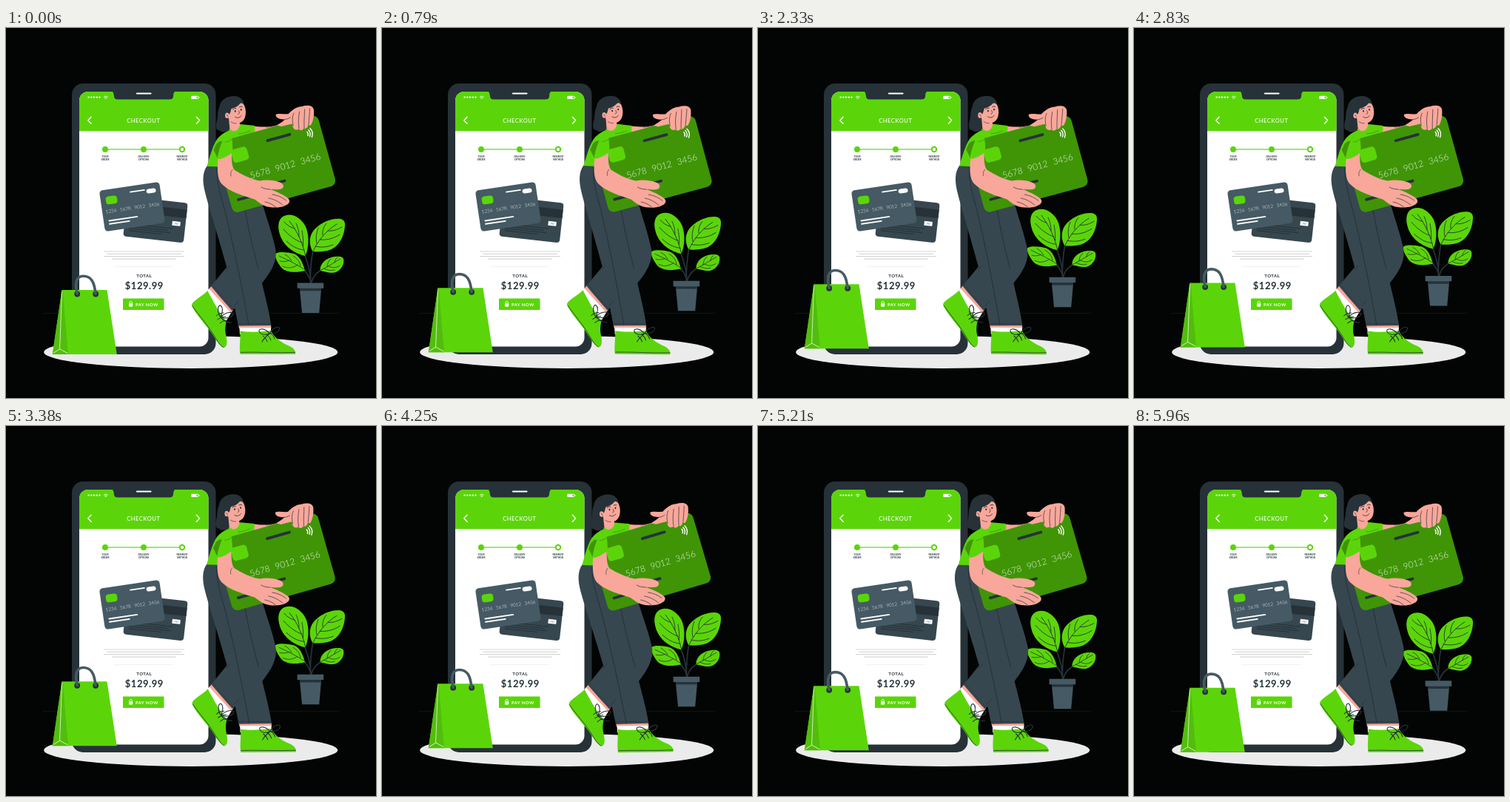
Write an HTML page with a canvas that moves like this. It is 500 px wide and 500 px high and loops after 6 s.

```html
<!DOCTYPE html>
<html lang="en">
<head>
<meta charset="utf-8">
<title>Checkout</title>
<style>
html, body { margin: 0; width: 100%; height: 100%; overflow: hidden; background: #030504; }
canvas { display: block; width: 100vw; height: 100vh; }
</style>
</head>
<body>
<canvas id="stage"></canvas>
<script>
const canvas = document.getElementById('stage');
const ctx = canvas.getContext('2d');
const LOOP = 6000;
const GREEN = '#5bd50a', DEEP = '#3f9506', SHADE = '#52bd0d';
const INK = '#263238', SLATE = '#455a64', CLOTH = '#37474f';
const SKIN = '#f9a79b', WHITE = '#fff', BACK = '#030504';

const paths = new Map();
function path(d) {
  if (!paths.has(d)) paths.set(d, new Path2D(d));
  return paths.get(d);
}
function fill(d, color) {
  ctx.fillStyle = color;
  ctx.fill(path(d));
}
function line(d, color, width) {
  ctx.strokeStyle = color;
  ctx.lineWidth = width;
  ctx.lineCap = ctx.lineJoin = 'round';
  ctx.stroke(path(d));
}
function box(x, y, w, h, r, color) {
  ctx.fillStyle = color;
  ctx.beginPath();
  ctx.roundRect(x, y, w, h, r);
  ctx.fill();
}
function dot(x, y, rx, color, ry = rx) {
  ctx.fillStyle = color;
  ctx.beginPath();
  ctx.ellipse(x, y, rx, ry, 0, 0, Math.PI * 2);
  ctx.fill();
}
function text(str, x, y, size, weight, color, spacing = 0, align = 'center', gap = 0) {
  ctx.font = `${weight} ${size}px Lato, sans-serif`;
  ctx.letterSpacing = spacing + 'px';
  ctx.wordSpacing = gap + 'px';
  ctx.textAlign = align;
  ctx.fillStyle = color;
  ctx.fillText(str, x, y);
}
function at(x, y, deg, draw) {
  ctx.save();
  ctx.translate(x, y);
  ctx.rotate(deg * Math.PI / 180);
  draw();
  ctx.restore();
}

function drawFloor() {
  line('M50 385.5H450', '#11181a', 0.8);
  dot(249.7, 438, 198.5, '#ebebeb', 22);
}

function drawHeader() {
  box(99, 86, 174.5, 53.2, [12, 12, 0, 0], GREEN);
  fill('M142 85.5C146 86 145.5 90 146 92.5C146.5 95.5 148 96.5 151 96.5H221C224 96.5 225.5 95.5 226 92.5C226.5 90 226 86 230 85.5Z', INK);
  line('M177 88.5H195.5', WHITE, 2.2);
  for (let i = 0; i < 5; i++) dot(111.6 + i * 3.7, 93.6, 1.2, WHITE);
  line('M132.2 93Q134.8 90.8 137.4 93M133.4 94.4Q134.8 93.2 136.2 94.4', WHITE, 0.8);
  dot(134.8, 95.6, 0.6, WHITE);
  box(250.3, 91.7, 9.8, 4.4, 1, WHITE);
  box(260.5, 93, 1, 1.8, 0.4, WHITE);
  box(257.6, 92.5, 1.8, 2.8, 0.3, GREEN);
  line('M115 120.3L110.8 124.8L115 129.3M257.4 120.3L261.6 124.8L257.4 129.3', WHITE, 1.4);
  text('CHECKOUT', 185.8, 127.8, 7.6, 500, WHITE, 0.5);
}

function drawSteps() {
  line('M134 164H238', '#7be04a', 1.5);
  dot(134, 164, 4, GREEN);
  dot(186, 164, 4, GREEN);
  dot(238, 164, 4.2, GREEN);
  dot(238, 164, 2.2, WHITE);
  [['YOUR', 'ORDER', 134], ['DELIVERY', 'OPTIONS', 186], ['PAYMENT', 'METHOD', 238]].forEach(([a, b, x]) => {
    text(a, x, 175, 3.2, 700, INK);
    text(b, x, 179, 3.2, 700, INK);
  });
}

function drawCards() {
  at(202, 259, 6.3, () => {
    box(-41, -27, 82, 54, 4, CLOTH);
    box(-41, -18, 82, 11.5, 0, INK);
    box(23, -0.8, 11, 6, 0.5, WHITE);
    line('M26.5 3.6L28 1L29.5 3.4L31 1.2', SLATE, 0.5);
    line('M-34 9.5H24M-34 12.5H18M-34 15.5H22M-34 18.5H10', INK, 1);
  });
  at(170.5, 241.5, -8.4, () => {
    box(-41, -28, 82, 56, 4.5, SLATE);
    box(-34, -18.5, 15.5, 10.8, 4, GREEN);
    box(22, -20.5, 13, 6, 3, WHITE);
    line('M.5 -20H19.5', WHITE, 1.9);
    text('1234 5678 9012 3456', 0.3, 3.8, 6.4, 300, WHITE, 0, 'center', 3);
    line('M-33.5 14.2H4.8M-33.5 18.6H-6.5', WHITE, 1.9);
  });
}

function drawPhone() {
  box(89, 75, 194.5, 366, 15, INK);
  box(99, 86, 174.5, 344.5, 12, WHITE);
  drawHeader();
  drawSteps();
  drawCards();
  line('M132.5 302H240.5M137 305.4H236.5M132.5 308.7H240.5M143.5 312.2H229', '#d6d6d6', 1.2);
  line('M146 322.5H224', '#eeeeee', 0.8);
  text('TOTAL', 186.7, 337.2, 6.1, 700, INK, 0.35);
  text('$129.99', 186.8, 353, 13, 700, INK, 0.55);
  box(158, 365.5, 55.5, 15.5, 0.5, GREEN);
  box(166, 372, 5.2, 4.4, 0.6, WHITE);
  line('M167 372.3V371A1.6 1.6 0 0 1 170.2 371V372.3', WHITE, 0.9);
  text('PAY NOW', 190.3, 375.5, 6, 700, WHITE, 0.35);
}

function drawBag() {
  fill('M75.5 354H136.5L149.8 441H62.8Z', GREEN);
  fill('M75.5 354H76.5L84 441H62.8Z', SHADE);
  line('M75.6 356L72.6 433.5', '#d9f5c4', 0.9);
  line('M64.5 439L72.6 433.8L83 439.4', '#e3f8d3', 0.9);
  dot(96.2, 359.5, 3.9, INK);
  dot(121.2, 359.5, 3.9, INK);
  line('M96.2 359C92.5 345 95 335.3 104.5 335.3C115 335.3 119.5 343 121 359', SLATE, 3.6);
}

function drawPlant() {
  line('M412 346C412 334 409 320 403 305M411.5 346C411 330 412 315 415 300M412 344C410 334 406 328 397 324M412.5 344C415 334 421 329 430 325', INK, 1.7);
  fill('M404.5 308C391 305 378 297 372 284C366 270 367 257 377 253.5C388 249.5 401 258 406 271C410 283 409 298 404.5 308Z', GREEN);
  fill('M414.5 302C408.5 292 409.5 279 418 271C428 261 443 256.5 452 258C456.5 259 458.5 262 458 267C457 284 448 298 434 301C427 302.5 419 302.5 414.5 302Z', GREEN);
  fill('M404 328C392 331 378 331 371.5 323C367 317 362.5 309 364 305C367 302 380 302.5 389 305C397 308 401 317 404 328Z', GREEN);
  fill('M424.5 328C424 318 433 310.5 444 309C451 308 456.5 309 456.3 313.5C457 322 450 330 442 330.8C434 331 429 328.5 424.5 328Z', GREEN);
  line('M405 309C401 291 394 275 383 261M401.5 295C402 286 401 280 400 274M396 282C396 274 394 268 392 264M400 290C391 287 382 280 375 272M403 300C394 299 386 295 379 288M390 271C386 270 380 267 376 262', INK, 0.9);
  line('M413.6 305C420 289 432 274 447 265M420 291C418 283 420 275 422 270M428 280C427 274 430 267 433 264M424 286C434 287 444 284 451 279M418 295C427 297 434 296 442 293M435 274C442 275 449 272 454 269', INK, 0.9);
  line('M406 328C394 320 382 314 369 308M394 320C387 325 380 325 374 322M383 314C378 316 374 316 370 315M398 322C397 315 393 311 388 308M386 315C384 311 381 308 377 306', INK, 0.8);
  line('M424 328C434 323 443 317 452 312M436 322C443 325 447 324 451 321M430 325C436 328 440 328 444 327M434 323C434 318 436 314 439 312M444 317C444 314 446 311 448 310', INK, 0.8);
  fill('M396.8 351H426.2L423.2 385H400Z', SLATE);
  fill('M396.8 351H426.2L425.8 355.2H397.2Z', INK);
  box(393.6, 344.5, 35.6, 7.3, 0.5, SLATE);
}

function drawShoes() {
  fill('M279 347L307 381L302 388L273 354Z', SKIN);
  fill('M274.5 352.5L304 385L297 397L269 358Z', WHITE);
  fill('M272.5 355C267 361 255 367 251.2 373C250 378 262 392 274 407C282 417 287 430 294.5 432C299.5 430.5 299 423 297 414C295.5 406 297 400 298 396C293 391 286 380 281 371C278 365 275 361 272.5 355Z', GREEN);
  line('M251.8 375.5C262 390 272 401 279 412C284 420 288 428 293.5 431.5', INK, 0.8);
  line('M284 389C287 386 291 385 294 385M286 394C290 391 294 390 297 390M289 399C292 396 296 395 299 395', INK, 1);
  line('M290 391C285 384 286 374 290 375C294 378 292 386 290 391C297 383 307 383 307 387C305 392 297 393 290 391C295 396 300 399 305 398', INK, 1.1);
  fill('M314 401H358L358.4 406H315Z', SKIN);
  fill('M315.5 405H358V414H316Z', WHITE);
  fill('M316.5 409.5C326 411 337 411 346 410L358 409C363 419 371 424 379 428C387 431 392 435 391 440.8H316.5C315 431 317 420 316.5 409.5Z', GREEN);
  line('M317 438.3C340 437.5 365 439.5 390.6 438.4', INK, 0.8);
  line('M347 416C350 418 352 421 353 424M352 414C355 416 357 419 358 422M357 412C360 414 362 417 363 420', INK, 1);
  line('M356 413C350 405 342 406 342 409C343 415 351 415 356 413C362 403 370 403 370 406C369 412 362 413 356 413C350 418 348 420 346 424', INK, 1.1);
}

function drawLegs() {
  fill('M300 321L277 349C286 360 295 370 305.5 382L347 343L340 305Z', CLOTH);
  fill('M300 230L346 236C352 256 361 282 364.3 299C367 317 356 332 345 346L318 330Z', CLOTH);
  fill('M272 186C265 195 265.5 208 269 222C274 242 288 285 298 322L314 402.5L358.4 402C355 380 350 362 345.5 343C336 304 331 262 326 235L300 186Z', CLOTH);
  line('M285 189C284 208 290 226 296 248C307 292 318 345 328 401', INK, 1);
  line('M323 246C327 268 334 300 341 325', INK, 1);
  line('M279 347C288 358 297 369 307 380M314 399.5H357', INK, 0.6);
  line('M303 321L297.5 327M314 369L308 376', INK, 0.8);
}

function drawHead() {
  fill('M289 106C285 113 287 119 284.8 126C283 133 284 139 288 138C291 142 299 141 302.5 137L304 118Z', INK);
  fill('M301 122L302.5 138C307 143.5 315 140 317 134L315 125Z', SKIN);
  fill('M302 105C308 103 315 100 320 101C323.5 106 325 113 323.3 119.5C321.5 126.5 316 129.5 310 128.3C304 127 300 123 300 119Z', SKIN);
  fill('M298 114C293 117 288 112 288.5 106C290 97 299 91.8 308 92C315.5 92 321 96 322 104C320 102 318 101 316.5 102C313 106 309 108 304.5 109C303.5 113 303 115.5 301.5 117C300 114 299 113.5 298 114Z', INK);
  dot(298.8, 118.3, 2.7, SKIN, 3.8);
  dot(309.7, 112.4, 1, INK, 1.3);
  dot(317.7, 110.4, 1, INK, 1.3);
  line('M306.5 110Q308.5 107.8 311 108.5M315.5 106.7Q317.5 105.4 319.4 106.5', INK, 0.9);
  line('M314.4 111.8C315.5 114 316.3 115.5 313.8 116.3M309.5 120.2Q314 123.4 318 118.6', INK, 0.8);
  line('M298 117.2Q300.2 117.5 300 120M304 127Q307.5 129.5 311 129', INK, 0.6);
}

function drawBigCard() {
  at(280.8, 155.9, -15.6, () => {
    box(0, 0, 145, 98.5, 8, DEEP);
    box(19, 15, 22, 18.5, 4.5, GREEN);
    text('1234 5678 9012 3456', 134, 59.5, 12, 300, '#e6f3df', 0, 'right', 4.2);
  });
  line('M353.5 152.2L383.5 143.8', INK, 3.8);
  line('M314 232L345 223.5M350 213.5L376.5 206.5', INK, 3.8);
  line('M406.8 140.2Q409 142.4 407.9 145.6M408.8 137.8Q412.4 141.6 410.5 146.6M410.8 135.6Q416 140.8 413.4 147.6', WHITE, 1.4);
}

function drawHands() {
  fill('M364.5 117C368 114.8 376 116.8 381.5 116.2C388 109.5 394 106 400 106C407 103.5 415.5 104.5 416 111C416.5 118 415.5 125 412.5 130.5C411 132.5 409 131.5 408.6 130C408 135 405 137 402.5 135.5C401 138.5 397 139 395.8 136.5C392.5 139 387.5 137 387.5 132L386.5 129.5L372 133L366 131.5C371 128 375 126 377 123.5C372 123.5 364 122.5 364.5 117Z', SKIN);
  line('M377 123.5C380 123.5 382 122 384 121M388 132C386.5 124 387 119 389 115M396 136C394.5 128 395.5 119 396.5 113M403 135C402.5 127 403.5 117 403.5 110M409 130C409.5 122 410.5 114 410.5 109', INK, 0.7);
  fill('M286.5 172L305 165C305 177 304.5 187 309 192C320 199 333 205 343 206.5C352 204.5 363 206 370 208.5C377 211 376 217 370 218C364 218.5 360 218 357 218C366 221 376 226 381.5 230.5C385 234 382 238 379 239C373 243.5 358 243.5 350 240.5C344 238 341 235 336 231.5C321 227 302 221 293 212C284 204 286 188 286.5 172Z', SKIN);
  line('M357 218C352 218 348 217 345 215M360 225C367 226 374 229 378.5 233M355 230C362 231 369 235 374 239.3M350 235C356 236 361 239 364.5 242', INK, 0.7);
  line('M306 191.5C304 194 303 197 304 200', INK, 0.6);
}

function drawPerson() {
  drawShoes();
  drawLegs();
  fill('M332 132C343 134 355 134.5 367 131L386 121L390 134L335 152Z', SKIN);
  line('M366 131.5C361 133.5 356 134 352 134', INK, 0.6);
  fill('M271.5 187C276 172 279 161 283.5 153C288 145 296 141 303 137.5L317 130L336 132C337 139 335 145 333 151L305 188Z', GREEN);
  drawHead();
  line('M302.5 137.5C306 143 315 140.5 317 132', GREEN, 2.2);
  line('M330 139C325 141 319 143 314 143', DEEP, 0.8);
  drawBigCard();
  fill('M289.5 152.5C285 156 282 160 280.5 165L286 176Z', DEEP);
  drawHands();
  fill('M303.5 139.5C296 143 289 156 285.5 177C293 178 300 172 306.5 168.5C306.5 158 305.5 149 303.5 139.5Z', GREEN);
  line('M289.5 153C287.5 159 286.5 165 285.8 172M304.5 151C302 153 299 154 296 154', DEEP, 0.8);
}

function sway(p) {
  if (p < 0.25) return 4 * p;
  return p < 0.75 ? 2 - 4 * p : 4 * p - 4;
}

function resize() {
  const ratio = window.devicePixelRatio || 1;
  const w = Math.round(innerWidth * ratio), h = Math.round(innerHeight * ratio);
  if (canvas.width !== w || canvas.height !== h) {
    canvas.width = w;
    canvas.height = h;
  }
  ctx.setTransform(w / 500, 0, 0, h / 500, 0, 0);
}

function frame(now) {
  const p = (now % LOOP) / LOOP;
  const lift = -10 * (1 - Math.abs(1 - 2 * p));
  resize();
  box(0, 0, 500, 500, 0, BACK);
  drawFloor();
  drawPhone();
  at(0, lift, 0, drawPlant);
  at(348, 266, sway(p), () => {
    ctx.translate(-348, -266);
    drawPerson();
  });
  at(0, lift, 0, drawBag);
  requestAnimationFrame(frame);
}
requestAnimationFrame(frame);
</script>
</body>
</html>
```
